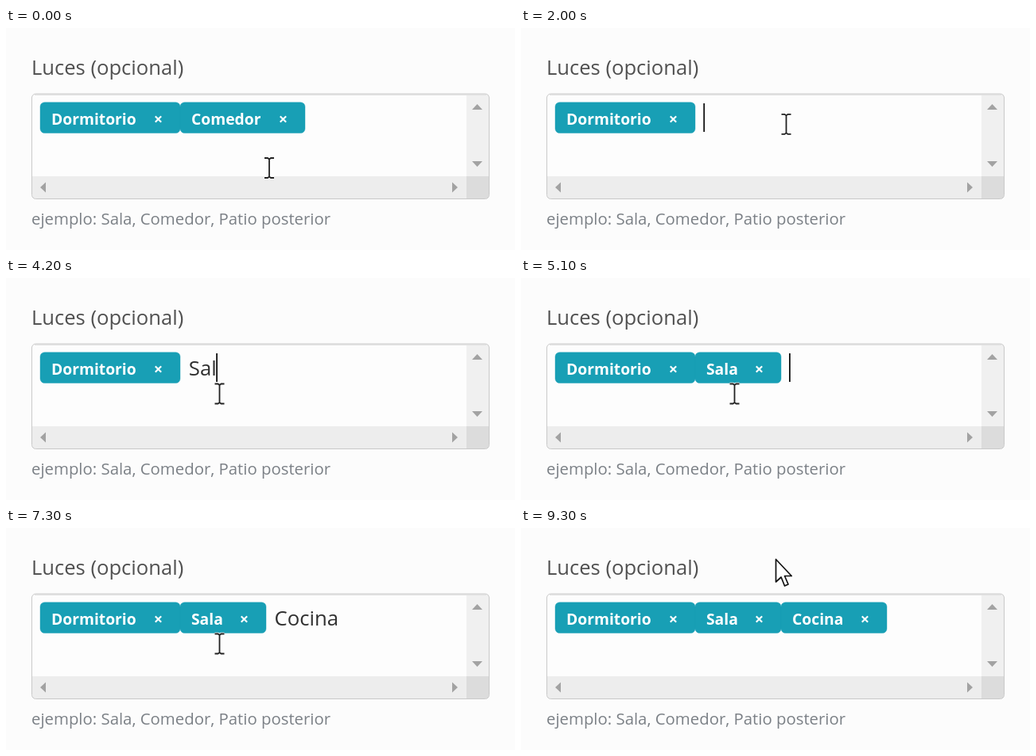
These frames come from a looping animation (640 px wide and 280 px high, 9.7 s). An HTML page:

```html
<!DOCTYPE html>
<html lang="es">
<head>
<meta charset="utf-8">
<title>Luces</title>
<style>
  html, body { margin: 0; width: 100%; height: 100%; overflow: hidden; background: #fcfcfc; }
  svg { display: block; width: 640px; height: 280px; }
  text { font-family: "Open Sans", "Noto Sans", sans-serif; white-space: pre; }
  .label { font-size: 25.6px; fill: #505050; }
  .help { font-size: 20.35px; fill: #7b8086; }
  .typed { font-size: 25.7px; fill: #303030; }
  .tag rect { fill: #189fb5; stroke: #189fb5; stroke-opacity: .4; }
  .tag text { font-size: 19.3px; font-weight: 700; fill: #fff; }
  .tag .close { font-size: 20px; text-anchor: middle; }
  .tag .well { fill: #137c91; stroke: #0f6b7e; stroke-opacity: .8; visibility: hidden; }
  .hover .close { fill: #04161b; }
  .pressed .well { visibility: visible; }
  .arrows { fill: #a2a2a2; }
  .pointer { fill: #fff; stroke: #111; stroke-width: 1.7; stroke-linejoin: round; }
</style>
</head>
<body>
<svg viewBox="0 0 640 280">
  <text class="label" x="32" y="58.6">Luces (opcional)</text>

  <rect x="32.5" y="83" width="575" height="132.500" rx="5" fill="#fdfdfd"/>
  <path d="M579 84H607V187H579Z" fill="#f0f0f0"/>
  <path d="M33 187H579V215H36Q33 215 33 211Z" fill="#ededed"/>
  <path d="M579 187H607V211Q607 215 603 215H579Z" fill="#dcdcdc"/>
  <path d="M36 84.3H604" stroke="#e2e2e2" stroke-width="1.4"/>
  <rect x="32.5" y="83" width="575" height="132.500" rx="5" fill="none" stroke="#c9c9c9"/>
  <path class="arrows" d="M586 103L592.5 96L599 103ZM586 168L592.5 175L599 168ZM50 194.500V207.500L43 201ZM561 194.500V207.500L568 201Z"/>

  <g id="tags"></g>
  <text id="typed" class="typed" y="122.500"></text>
  <rect id="caret" y="95" width="1.8" height="36" fill="#111"/>

  <text class="help" x="32" y="248">ejemplo: Sala, Comedor, Patio posterior</text>

  <g id="cursor">
    <g id="beam" fill="none">
      <path d="M-6-12.500H-2L0-11L2-12.500H6M0-11V11M-6 12.500H-2L0 11L2 12.500H6" stroke="#fff" stroke-width="3.6"/>
      <path d="M-6-12.500H-2L0-11L2-12.500H6M0-11V11M-6 12.500H-2L0 11L2 12.500H6" stroke="#222" stroke-width="1.8"/>
    </g>
    <path id="arrow" class="pointer" d="M0 0V28.500L6.600 22.500L11 33.500L15.500 31.500L11 21H19.700Z"/>
    <g id="hand" class="pointer">
      <path d="M-2 2Q-2-1 1.500-1T5 2V10Q9 8 10 11Q14 9.500 15 13Q19 12 19 16V25Q19 28 16.500 31V35H2V31L-7 20Q-9 15-6 14Q-4 14-2 17Z"/>
      <path d="M5 10V17M10 11V17M15 13V18" fill="none"/>
    </g>
  </g>
</svg>
<script>
const LOOP = 9700, STEP = 100;
const $ = id => document.getElementById(id);

// name, left, width, shown from, shown until
const tags = [
  ["Dormitorio", 43, 176, 0, LOOP],
  ["Comedor", 219, 157, 0, 1800],
  ["Sala", 219, 108, 5100, LOOP],
  ["Cocina", 327, 133, 7600, LOOP]
].map(([name, x, w, from, to]) => {
  const g = document.createElementNS("http://www.w3.org/2000/svg", "g");
  g.setAttribute("class", "tag");
  g.innerHTML = `<rect x="${x}" y="93.700" width="${w}" height="38.800" rx="5.5"/>
    <rect class="well" x="${x + w - 42}" y="101.500" width="28" height="27"/>
    <text x="${x + 14}" y="122">${name}</text>
    <text class="close" x="${x + w - 27.5}" y="122">×</text>`;
  $("tags").append(g);
  return { g, from, to };
});

// Every event restarts the caret blink: time, left edge, text
const edits = [
  [1800, 229.8, ""],
  [3900, 229.8, "S"], [4100, 229.8, "Sa"], [4200, 229.8, "Sal"], [4300, 229.8, "Sala"],
  [5100, 337.5, ""],
  [5900, 337.5, "C"], [6100, 337.5, "Co"], [6200, 337.5, "Coc"],
  [6400, 337.5, "Coci"], [6500, 337.5, "Cocin"], [6700, 337.5, "Cocina"],
  [7600, 470.5, ""]
];

// time, x, y
const path = [
  [0, 331, 176.5], [800, 352, 112.5], [1700, 352, 112.5], [2500, 293.5, 140.5],
  [2800, 293.5, 140.5], [2950, 284, 151], [3100, 268.5, 146],
  [8000, 268.5, 146], [8500, 312, 29], [8800, 320.5, 39.5], [LOOP, 320.5, 39.5]
];

function cursorAt(t) {
  const i = path.findIndex(p => p[0] > t);
  const [t0, x0, y0] = path[i - 1], [t1, x1, y1] = path[i];
  const u = (t - t0) / (t1 - t0), k = u * u * (3 - 2 * u);
  return [x0 + (x1 - x0) * k, y0 + (y1 - y0) * k];
}

const show = (el, on) => el.style.display = on ? "" : "none";

function draw(t) {
  const [x, y] = cursorAt(t);
  const hover = t < 1800 && y < 130;
  const arrow = t > 8000 && y < 133;

  for (const { g, from, to } of tags) show(g, t >= from && t < to);
  tags[1].g.classList.toggle("hover", hover);
  tags[1].g.classList.toggle("pressed", t >= 1700 && t < 1800);

  const edit = edits.filter(e => e[0] <= t).pop();
  const typed = $("typed");
  typed.textContent = edit ? edit[2] : "";
  if (edit) {
    typed.setAttribute("x", edit[1]);
    const w = edit[2] ? typed.getComputedTextLength() : 0;
    $("caret").setAttribute("x", edit[1] + w - 0.5);
  }
  show($("caret"), edit && Math.floor((t - edit[0]) / 500) % 2 === 0);

  $("cursor").setAttribute("transform", `translate(${x.toFixed(1)} ${y.toFixed(1)})`);
  show($("hand"), hover);
  show($("arrow"), arrow);
  show($("beam"), !hover && !arrow);
}

const start = performance.now();
function tick() {
  const t = (performance.now() - start) % LOOP;
  draw(Math.floor(t / STEP) * STEP);
  requestAnimationFrame(tick);
}
tick();
</script>
</body>
</html>
```
